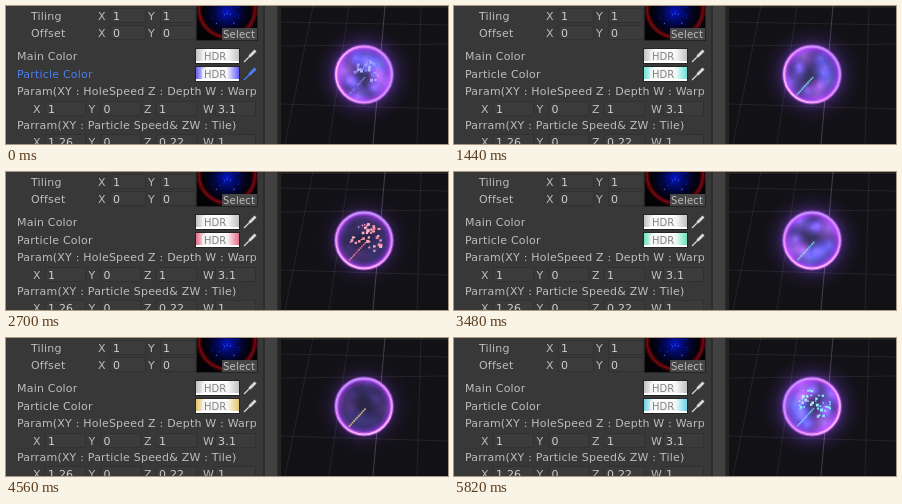
An HTML page with a canvas for the animation above (5.88 s loop, 442 by 138 pixels).

```html
<!DOCTYPE html>
<html lang="en">
<head>
<meta charset="utf-8">
<title>Orb material</title>
<style>
html, body { margin: 0; width: 100%; height: 100%; overflow: hidden; background: #383838; }
canvas, svg { position: absolute; left: 0; top: 0; width: 442px; height: 138px; }
text { font: 11px "DejaVu Sans", Verdana, sans-serif; letter-spacing: .2px; fill: #bdbdbd; }
text.value { fill: #cfcfcf; }
text.small { font-size: 10px; }
text.hdr { font-size: 10px; letter-spacing: 0; fill: #858585; }
</style>
</head>
<body>
<canvas id="stage" width="442" height="138"></canvas>
<svg id="labels" viewBox="0 0 442 138"></svg>
<script>
const LOOP = 5880, STEP = 60, BURST = 522, PULSE = LOOP / 3, TAU = Math.PI * 2;
const ctx = document.getElementById('stage').getContext('2d');
const svg = document.getElementById('labels');
const ball = { x: 358, y: 68.5, r: 28.5 };
const frac = v => v - Math.floor(v);
const clamp = v => Math.max(0, Math.min(1, v));
const rand = n => frac(Math.sin(n * 91.73 + 4.1) * 43758.5453);
const hsl = (h, s, l, a = 1) => `hsla(${h},${s}%,${l}%,${a})`;

// time, hue of the particle colour
const hues = [[0, 242], [1200, 242], [1920, 43], [2700, -15], [3480, -200], [4560, -315], [5880, -542]];

function hueAt(t) {
  const i = Math.max(1, hues.findIndex(k => t < k[0]));
  const [a, b] = [hues[i - 1], hues[i]];
  return a[1] + (b[1] - a[1]) * (t - a[0]) / (b[0] - a[0]);
}

function label(text, x, y, cls = '') {
  const el = document.createElementNS('http://www.w3.org/2000/svg', 'text');
  el.setAttribute('x', x);
  el.setAttribute('y', y);
  el.setAttribute('class', cls);
  el.textContent = text;
  svg.append(el);
  return el;
}

const fields = [];
function vector(columns, y, width, values) {
  values.forEach((v, i) => {
    label('XYZW'[i], columns[i], y);
    label(v, columns[i] + 15, y, 'value');
    fields.push([columns[i] + 12, y - 12, width]);
  });
}

const pair = [92, 142], quad = [27, 82.5, 138, 197];
label('Tiling', 25, 14);
label('Offset', 25, 31);
vector(pair, 14, 36, ['1', '1']);
vector(pair, 31, 36, ['0', '0']);
label('Main Color', 11, 54);
const focusLabel = label('Particle Color', 11, 72);
label('Param(XY : HoleSpeed Z : Depth W : Warp', 11, 89);
vector(quad, 107, 41, ['1', '0', '1', '3.1']);
label('Parram(XY : Particle Speed& ZW : Tile)', 11, 123);
vector(quad, 140, 41, ['1.26', '0', '0.22', '1']);
label('Select', 217, 31.5, 'small');
label('HDR', 198, 54, 'hdr');
label('HDR', 198, 72, 'hdr');

function rect(x, y, w, h, fill) {
  ctx.fillStyle = fill;
  ctx.fillRect(x, y, w, h);
}

function line(x1, y1, x2, y2, color, width = 1) {
  ctx.strokeStyle = color;
  ctx.lineWidth = width;
  ctx.beginPath();
  ctx.moveTo(x1, y1);
  ctx.lineTo(x2, y2);
  ctx.stroke();
}

function glow(x, y, r, color, clear) {
  const g = ctx.createRadialGradient(x, y, 0, x, y, r);
  g.addColorStop(0, color);
  g.addColorStop(1, clear);
  ctx.fillStyle = g;
  ctx.fillRect(x - r, y - r, r * 2, r * 2);
}

function ring(x, y, r, color, width) {
  ctx.strokeStyle = color;
  ctx.lineWidth = width;
  ctx.beginPath();
  ctx.arc(x, y, r, 0, TAU);
  ctx.stroke();
}

function thumbnail() {
  rect(190, 0, 62, 35, '#242424');
  ctx.save();
  ctx.beginPath();
  ctx.rect(191, 0, 60, 34);
  ctx.clip();
  rect(191, 0, 60, 34, '#030205');
  ring(221, 3, 28, 'rgba(125,5,12,.5)', 5);
  ring(221, 3, 28, '#780a12', 1.5);
  glow(221, 6, 25, 'rgba(6,22,215,.95)', 'rgba(0,0,70,0)');
  for (let i = 0; i < 24; i++) {
    const a = rand(i) * TAU, d = rand(i + 50) * 20;
    rect(221 + Math.cos(a) * d, 7 + Math.sin(a) * d, 1, 1, i % 4 ? '#1430dc' : '#4a7cff');
  }
  ctx.restore();
  rect(216, 22, 35, 12, '#464646');
}

function swatch(y, edge) {
  rect(189, y - 1, 45, 16, '#252525');
  const g = ctx.createLinearGradient(190, 0, 233, 0);
  g.addColorStop(0, edge);
  g.addColorStop(.25, '#fff');
  g.addColorStop(.7, '#fff');
  g.addColorStop(1, edge);
  rect(190, y, 43, 13, g);
  rect(196, y + 2, 26, 10, 'rgba(245,245,245,.85)');
  rect(190, y + 12, 43, 2, '#fff');
}

function picker(y, color) {
  line(238, y + 13, 245, y + 6, color, 1.3);
  line(243.5, y + 7.5, 249.5, y + 1.5, color, 2.8);
}

function panel(t, hue) {
  const focused = t < 1140;
  rect(0, 0, 257, 138, '#383838');
  rect(257, 0, 15, 138, '#2c2c2c');
  rect(259, 0, 12, 138, '#414141');
  fields.forEach(([x, y, w]) => {
    rect(x, y, w, 15, '#313131');
    rect(x + 1, y + 1, w - 2, 13, '#3b3b3b');
  });
  thumbnail();
  swatch(43, '#c5c0c3');
  swatch(61, hsl(hue, focused ? 85 : 66, 66));
  picker(43, '#d8d8d8');
  picker(61, focused ? '#4a82f5' : '#d8d8d8');
  focusLabel.style.fill = focused ? '#4b7df2' : '#bdbdbd';
}

function scene() {
  rect(271, 0, 4, 138, '#242424');
  rect(275, 0, 167, 138, '#121116');
  rect(275, 0, 167, 2, '#222');
  const faint = 'rgba(125,125,135,.16)';
  for (let i = -2; i < 3; i++) {
    if (i) line(379 + i * 36, 0, 367 + i * 44, 138, faint);
  }
  line(275, 16, 442, 19, faint);
  line(275, 40, 442, 38, faint);
  line(275, 98, 442, 103, faint);
  line(379, 0, 367, 138, 'rgba(155,150,165,.35)');
}

function nebula(t, power) {
  const turn = t / 1500;
  for (let i = 0; i < 11; i++) {
    const a = i * 2.4 + turn, d = 4 + 20 * rand(i + 7);
    const h = i % 4 ? 225 + 35 * rand(i) : 285;
    glow(ball.x + Math.cos(a) * d, ball.y + Math.sin(a) * d, 8 + rand(i + 20) * 9,
      hsl(h, 75, 66, .08 + power * .4), hsl(h, 75, 50, 0));
  }
}

function beam(t, hue) {
  for (let i = 0; i < 11; i++) {
    const p = frac(i / 11 + t / 2600);
    const x = 343 + p * 17, y = 88.5 - p * 18.5;
    rect(x - .8, y - .8, 1.7, 1.7, hsl(hue, 75, 62 + 18 * rand(i), .85));
  }
}

// Each cycle a cluster appears at the tip of the beam and scatters through the ball.
function burst(t, hue) {
  const clock = (t - 850) / BURST;
  const age = frac(clock), cycle = Math.floor(clock);
  const alpha = clamp((age - .14) * 7);
  if (!alpha) return;
  const spread = .2 + .8 * Math.pow((age - .14) / .86, .8);
  for (let i = 0; i < 40; i++) {
    const n = i + cycle * 41;
    if (rand(n + 60) < (age - .5) * 1.1) continue;
    const a = -1.1 + (rand(n) - .5) * (3.6 + age * 2.4);
    const d = 26 * Math.sqrt(rand(n + 400)) * spread;
    const size = 1.2 + rand(n + 800) * 1.9;
    const x = 361 + Math.cos(a) * d, y = 67 + Math.sin(a) * d;
    rect(x - size / 2, y - size / 2, size, size,
      hsl(hue, 85, 62 + 16 * rand(n + 90) + 18 * age, alpha));
  }
}

function halo(power) {
  const { x, y, r } = ball;
  const g = ctx.createRadialGradient(x, y, r - 2, x, y, r + 22);
  g.addColorStop(0, `rgba(150,70,240,${.5 + power * .25})`);
  g.addColorStop(.2, `rgba(90,40,170,${.22 + power * .18})`);
  g.addColorStop(.5, `rgba(60,30,120,${.08 + power * .12})`);
  g.addColorStop(1, 'rgba(40,15,80,0)');
  ctx.save();
  ctx.globalCompositeOperation = 'lighter';
  ctx.fillStyle = g;
  ctx.beginPath();
  ctx.arc(x, y, r + 22, 0, TAU);
  ctx.arc(x, y, r - 2, 0, TAU, true);
  ctx.fill();
  ctx.restore();
}

function orb(t, hue) {
  const power = .5 + .5 * Math.cos((t / PULSE + .08) * TAU);
  const { x, y, r } = ball;
  halo(power);

  ctx.save();
  ctx.beginPath();
  ctx.arc(x, y, r, 0, TAU);
  ctx.clip();
  const body = ctx.createRadialGradient(x, y, 5, x, y, r);
  body.addColorStop(0, hsl(246, 30, 20 + power * 12));
  body.addColorStop(.65, hsl(252, 36, 25 + power * 14));
  body.addColorStop(.87, hsl(268, 55, 42 + power * 10));
  body.addColorStop(1, '#c76cf2');
  rect(x - r, y - r, r * 2, r * 2, body);
  ctx.globalCompositeOperation = 'lighter';
  nebula(t, power);
  ctx.globalCompositeOperation = 'source-over';
  beam(t, hue);
  burst(t, hue);
  ctx.restore();

  const turn = t / 2200, c = Math.cos(turn) * r, s = Math.sin(turn) * r;
  const rim = ctx.createLinearGradient(x - c, y + s, x + c, y - s);
  rim.addColorStop(0, '#ffb2f6');
  rim.addColorStop(.5, '#e48cfb');
  rim.addColorStop(1, '#bf92ff');
  ring(x, y, r - .8, 'rgba(195,90,245,.5)', 4.5);
  ring(x, y, r - .6, rim, 2);
}

function draw(now) {
  const t = Math.floor((now % LOOP) / STEP) * STEP;
  const hue = hueAt(t);
  scene();
  orb(t, hue);
  panel(t, hue);
}

const start = performance.now();
function tick() {
  draw(performance.now() - start);
  requestAnimationFrame(tick);
}
tick();
</script>
</body>
</html>
```
